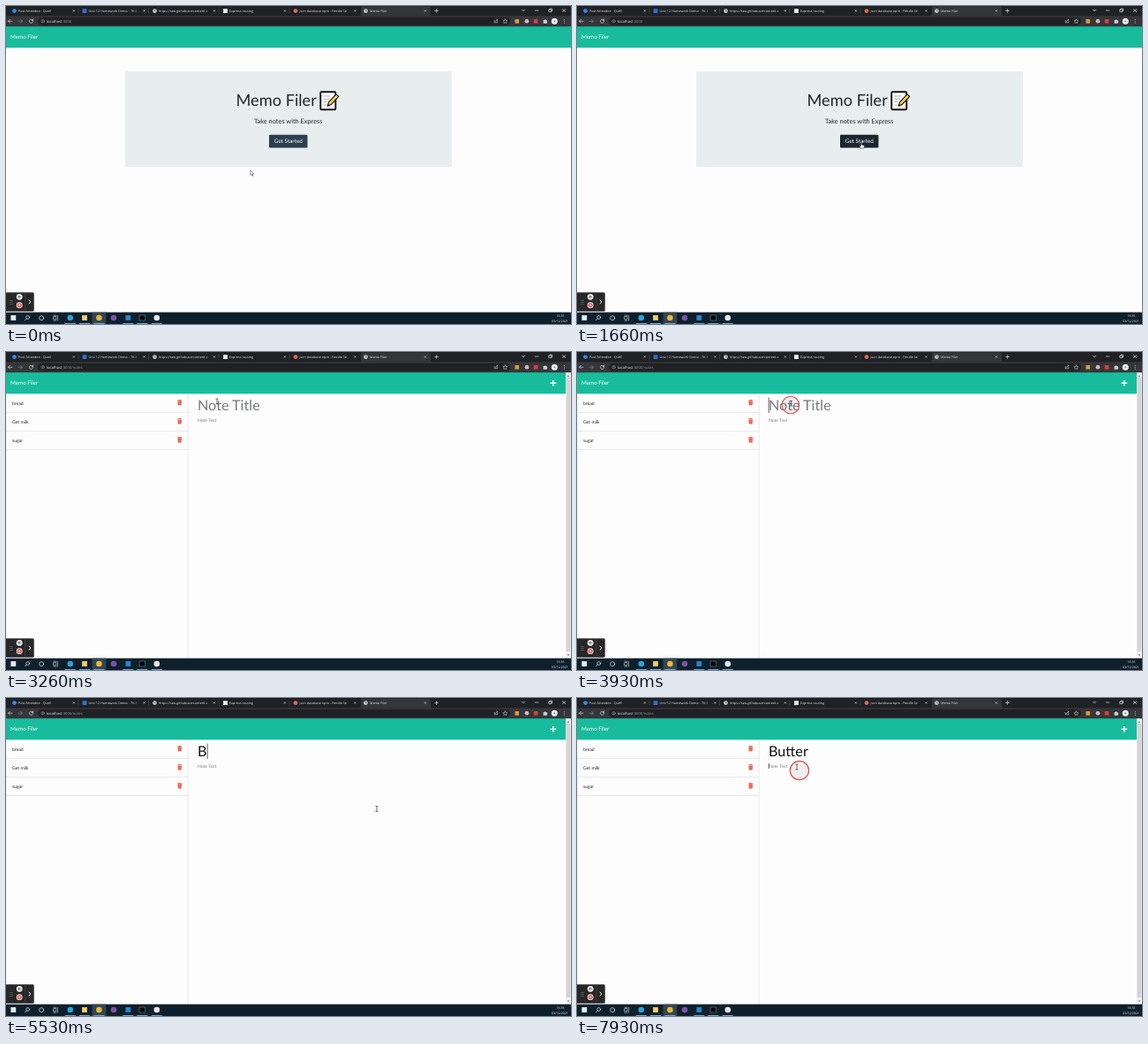
Recreate the animation shown at these times as an HTML page. Size 640 px wide and 360 px high, loop 8 s.

```html
<!DOCTYPE html>
<html lang="en">
<head>
<meta charset="utf-8">
<title>Memo Filer</title>
<style>
  html, body { margin: 0; width: 100%; height: 100%; overflow: hidden; background: #fdfdfd; }
  svg { display: block; width: 100vw; height: 100vh; }
  text { font-family: Lato, sans-serif; text-rendering: geometricPrecision; white-space: pre; }
  .ui { font-family: "Open Sans", "Noto Sans", sans-serif; }
  .line { fill: none; stroke-linecap: round; stroke-linejoin: round; }
</style>
</head>
<body>
<svg id="stage" viewBox="0 0 640 360" xmlns="http://www.w3.org/2000/svg">
  <defs>
    <g id="globe">
      <circle r="2.3" fill="#e6e8ea"/>
      <path d="M-1.7-.8L-.4-1.5L.5-.5L-.5.2L-.3 1.6M.8-1.5L1.6.2L.7.8" class="line" stroke="#5f6368" stroke-width=".6"/>
    </g>
    <g id="bin" fill="#e74c3c">
      <path d="M-2.6-2.7h1.5l.4-.5h1.4l.4.5h1.5v.8h-5.2z"/>
      <path d="M-2.2-1.5h4.4l-.2 4.1q0 .6-.6.6h-2.8q-.6 0-.6-.6z"/>
      <path d="M-1-.8v3.2M0-.8v3.2M1-.8v3.2" stroke="#f7c4be" stroke-width=".35"/>
    </g>
  </defs>

  <rect width="640" height="360" fill="#fdfdfd"/>
  <rect y="23" width="640" height="24.3" fill="#18bc9c"/>
  <text x="5" y="37.3" font-size="6.25" fill="#fff">Memo Filer</text>

  <g id="home">
    <rect x="135" y="74" width="370" height="108" fill="#e8eeed"/>
    <text x="260.5" y="113" font-size="18.2" fill="#212529">Memo Filer</text>
    <g id="pad">
      <rect x="356.3" y="97.2" width="17" height="20" rx="1" fill="#fff" stroke="#111" stroke-width="1.9"/>
      <path d="M359.5 102h8M359.5 105.3h7M359.5 108.6h4M359.5 112h4" stroke="#a7b4ba" stroke-width="1"/>
      <path d="M364.3 113.2l1.3-4.4 8.4-9 2.8 2.6-8.6 9.2z" fill="#f7c64a" stroke="#111" stroke-width="1.1" stroke-linejoin="round"/>
      <path d="M364.3 113.2l.6-2 1.5 1.3z" fill="#111"/>
      <path d="M366.5 110l7.5-8" stroke="#fff0bd" stroke-width=".6"/>
    </g>
    <text x="319.8" y="132.7" font-size="7.4" fill="#212529" text-anchor="middle">Take notes with Express</text>
    <rect id="glow" x="297.2" y="145" width="45.2" height="16.4" rx="1.8" fill="#96a5ae"/>
    <rect id="button" x="298" y="145.8" width="43.5" height="14.8" rx="1.3"/>
    <text x="319.8" y="155.4" font-size="6.35" fill="#fff" text-anchor="middle">Get Started</text>
  </g>

  <g id="notes">
    <path d="M619.9 32v6.6M616.6 35.3h6.6" stroke="#fff" stroke-width="1.6"/>
    <path d="M.4 47.3V347M206.2 47.3V347" stroke="#dfe2e3" stroke-width=".7"/>
    <g id="list"></g>
    <text id="title" x="217" y="66" font-size="16.2"></text>
    <text x="217" y="79" font-size="5" fill="#7b7f82">Note Text</text>
    <rect x="634" y="23" width="6" height="324" fill="#f1f1f1"/>
    <rect x="634.6" y="29" width="4.8" height="310" fill="#d4d4d4"/>
    <path d="M635.5 27.8l1.5-1.6 1.5 1.6zM635.5 342.4l1.5 1.6 1.5-1.6z" fill="#666"/>
    <rect id="caret" width=".7" fill="#222"/>
  </g>

  <g id="browser">
    <rect width="640" height="12" fill="#202124"/>
    <path d="M400 11.5q2 0 2-2V2.500q0-2 2-2h75q2 0 2 2v7q0 2 2 2z" fill="#35363a"/>
    <rect y="11.2" width="640" height="12" fill="#35363a"/>
    <rect x="36" y="12.7" width="535" height="9" rx="4.500" fill="#202124"/>
    <g id="tabs"></g>
    <g class="line" stroke="#dadce0" stroke-width=".7">
      <path d="M485.800 5.500h3.600M487.600 3.700v3.600"/>
      <path d="M584.600 4.300l1.600 1.600 1.600-1.600M599.500 5h3.500M615.200 4h2.600v2.600h-2.600zM616 4v-.9h2.700v2.700H618M630.500 3.500l3.200 3.200M633.700 3.500l-3.200 3.200"/>
      <path d="M7 17.200H2.600M4.500 15.300l-1.900 1.900 1.900 1.900"/>
      <path d="M14 17.200h4.400M16.500 15.300l1.900 1.900-1.900 1.900" stroke="#85888c"/>
      <path id="reload" d="M30.300 16.100a2.100 2.100 0 1 0 .3 1.500M30.600 14.900v1.500h-1.500"/>
      <path id="stop" d="M26.900 15.600l3.200 3.200M30.100 15.600l-3.200 3.200"/>
      <circle cx="41.600" cy="17.200" r="1.700" stroke="#a5a8ac" stroke-width=".5"/>
      <path d="M41.600 17v1M41.600 16.200v.01" stroke="#a5a8ac" stroke-width=".5"/>
      <path d="M553.200 16.400v2.400h3.500v-1.200M554.500 17.500q.2-1.800 2.300-1.800M556 14.900l.9.8-.9.8" stroke-width=".55"/>
      <path d="M565.400 14.900l.75 1.600 1.750.2-1.300 1.200.35 1.700-1.550-.85-1.550.85.35-1.700-1.300-1.200 1.750-.2z" stroke-width=".5"/>
    </g>
    <rect x="576.500" y="15" width="4.600" height="4.600" fill="#dd9a38"/>
    <circle cx="590" cy="17.200" r="2.400" fill="#d8b5b2"/>
    <rect x="597.800" y="15" width="4.600" height="4.600" fill="#d9403c"/>
    <path d="M608.600 16h1.300a.8.8 0 0 1 1.600 0h1.300v1.300a.8.8 0 0 1 0 1.500v1h-4.200z" fill="#c9ccd0"/>
    <circle cx="621.300" cy="17.200" r="3.500" fill="#eceef0"/>
    <circle cx="621.300" cy="17.200" r="1" fill="#8b8f94"/>
    <path d="M632.400 15.300v.01M632.400 17.200v.01M632.400 19.100v.01" class="line" stroke="#dadce0" stroke-width=".9"/>
    <text class="ui" x="46" y="18.900" font-size="4.200" fill="#eceef0">localhost<tspan id="path" fill="#94989d"></tspan></text>
  </g>

  <g id="taskbar">
    <rect y="346.700" width="640" height="13.300" fill="#0f202d"/>
    <rect x="97.500" y="346.700" width="15.800" height="13.300" fill="#35444f"/>
    <g class="line" stroke="#e4e8eb" stroke-width=".7">
      <circle cx="24.700" cy="352.500" r="1.900"/><path d="M23.300 353.900l-1.700 1.800"/>
      <circle cx="40.200" cy="353.200" r="2.500"/>
      <path d="M54 351.600h3v3.200h-3zM54 350.300h3M54 356.100h3M58.600 350.500v5.500" stroke-width=".55"/>
    </g>
    <g id="apps"></g>
    <g class="ui" font-size="3.500" fill="#f0f2f4" text-anchor="middle">
      <text class="ui" x="628" y="351.800">16:35</text>
      <text class="ui" x="627.500" y="357.700">03/12/2021</text>
    </g>
  </g>

  <g id="recorder">
    <rect x="-2" y="324" width="34" height="22" rx="1.800" fill="#272727" stroke="#e4e4e4" stroke-width=".6"/>
    <path d="M21.800 324.400v21.200" stroke="#555" stroke-width=".5"/>
    <path d="M5 333.500v.01M7 333.500v.01M5 335.500v.01M7 335.500v.01M5 337.500v.01M7 337.500v.01" class="line" stroke="#aaa" stroke-width=".8"/>
    <circle cx="15.200" cy="329.300" r="3.400" fill="#f4f4f4"/>
    <path d="M14.400 327.900v2.800M16 327.900v2.800" stroke="#333" stroke-width=".8"/>
    <circle cx="15.200" cy="338.700" r="3.400" fill="#f5eeee"/>
    <circle cx="15.200" cy="338.700" r="2.500" fill="#e0483e"/>
    <rect x="14.300" y="337.800" width="1.800" height="1.800" fill="#fff"/>
    <path d="M26 333l1.900 2-1.900 2" class="line" stroke="#fff" stroke-width=".9"/>
  </g>

  <circle id="ring"/>
  <g id="pointer">
    <path id="arrow" d="M0-2.800v5.300l1.200-1.100.9 2 .9-.4-.9-1.900h1.600z" fill="#fff" stroke="#222" stroke-width=".5"/>
    <path id="hand" d="M-.8-2.500q.6-.8 1.100 0v2.200l2.200.5q.7.200.6.900l-.5 2.500h-3.200l-1.900-2.400q.2-.8 1.700.2z" fill="#fff" stroke="#222" stroke-width=".5"/>
    <path id="beam" d="M-1.100-3q.9 0 1.100.4q.2-.4 1.100-.4M0-2.600v5.200M-1.100 3q.9 0 1.100-.4q.2.4 1.100.4" class="line" stroke="#222" stroke-width=".65"/>
  </g>
</svg>
<script>
const LOOP = 8000, BLINK = 530;
const OPEN = 2230, LOADED = 2600, FOCUS_TITLE = 3800, FOCUS_TEXT = 7740;
const $ = id => document.getElementById(id);
const set = (el, attrs) => { for (const k in attrs) el.setAttribute(k, attrs[k]); };
const show = (id, on) => { $(id).style.display = on ? "" : "none"; };

// favicon: a colour for a plain mark, or the globe
const tabs = [
  [9.5, "Post Attendee - Quell", "#2d8cff", true],
  [89, "Unit 12 Homework Demo - 7K-I", "#2f6fd6", false],
  [168.5, "https://raw.githubusercontent.c", ""],
  [248.5, "Express routing", "#eeeeee", false],
  [328, "json database npm - Fendle Se", "#e2685b", true],
  [407.5, "Memo Filer", ""]
];
const mark = (x, y, r, color, round) => round
  ? `<circle cx="${x}" cy="${y}" r="${r}" fill="${color}"/>`
  : `<rect x="${x - r}" y="${y - r}" width="${2 * r}" height="${2 * r}" fill="${color}"/>`;

$("tabs").innerHTML = tabs.map(([x, label, color, round], i) => {
  const icon = color ? mark(x, 5.6, 2.4, color, round)
    : `<use ${i === 5 ? 'id="favicon"' : ""} href="#globe" x="${x}" y="5.6"/>`;
  const edge = i < 4 ? `<path d="M${x + 72.500} 2.500v6" stroke="#5f6368" stroke-width=".5"/>` : "";
  return `${icon}<text class="ui" x="${x + 4.500}" y="7" font-size="3.75" fill="#dfe1e4">${label}</text>
    <path d="M${x + 66.300} 4.400l2.200 2.200m0-2.200l-2.200 2.200" stroke="#dadce0" stroke-width=".6"/>${edge}`;
}).join("") + '<path id="spinner" d="M0-2a2 2 0 0 1 2 2" class="line" stroke="#9aa6b5" stroke-width=".7"/>';

$("list").innerHTML = ["bread", "Get milk", "sugar"].map((name, i) => {
  const y = 57.500 + 21.100 * i;
  return `<text x="7" y="${y + 2}" font-size="5.1" fill="#212529">${name}</text>
    <use href="#bin" x="196.700" y="${y - .4}"/>
    <path d="M0 ${y + 10.900}h206" stroke="#dfe2e3" stroke-width=".7"/>`;
}).join("");

// x, colour, round, running
const apps = [
  [8.3, "#e6edf2", false, false], [72.8, "#2da3d5", true, true], [89, "#f3cf69", false, true],
  [105.400, "#e6b83c", true, true], [122, "#7d52a5", true, false], [138.300, "#2489ca", false, true],
  [154.300, "#050708", false, true], [170.800, "#e9e6ea", true, true]
];
$("apps").innerHTML = apps.map(([x, color, round, running]) =>
  mark(x, 353, round ? 3.300 : 2.900, color, round) +
  (running ? `<path d="M${x - 6} 359.500h12" stroke="#76b9ed" stroke-width=".9"/>` : "")).join("");
$("apps").innerHTML += '<path d="M151 350h6.600v6h-6.600z" fill="none" stroke="#87929a" stroke-width=".5"/>';

// time, x, y
const route = [
  [0, 277, 189], [120, 277, 189], [680, 322.500, 158], [1500, 322.500, 158], [1900, 322, 156.500],
  [2300, 322, 156.500], [2460, 323, 194], [2640, 321, 188], [2860, 321, 188], [3240, 239, 56],
  [3880, 239, 57], [4530, 443, 120.500], [4860, 443, 120.500], [5530, 420, 125.500],
  [6660, 420, 125.500], [7390, 249, 78], [LOOP, 249, 78]
];
function place(t) {
  const i = route.findIndex(p => p[0] > t);
  const [t0, x0, y0] = route[i - 1], [t1, x1, y1] = route[i];
  const u = (t - t0) / (t1 - t0), e = u * u * (3 - 2 * u);
  return [x0 + (x1 - x0) * e, y0 + (y1 - y0) * e];
}

const clicks = [[OPEN, 322, 155], [FOCUS_TITLE, 242, 60], [FOCUS_TEXT, 252, 82]];
function drawRing(t) {
  const click = clicks.find(c => t >= c[0] && t < c[0] + 430);
  show("ring", click);
  if (!click) return;
  const age = t - click[0], grow = Math.min(1, age / 150);
  set($("ring"), {
    cx: click[1], cy: click[2], r: 4 + 6.600 * grow,
    fill: "rgba(110,70,70,.08)", stroke: "#d8504b", "stroke-width": 1.200,
    opacity: Math.min(1, (430 - age) / 180)
  });
}

const keys = [5400, 5730, 5860, 5990, 6200, 6330];
function drawFields(t) {
  const typed = "Butter".slice(0, keys.filter(k => k <= t).length);
  const title = $("title");
  title.textContent = typed || "Note Title";
  title.setAttribute("fill", typed ? "#111" : "#77797b");
  const inText = t >= FOCUS_TEXT;
  const since = Math.max(FOCUS_TITLE, ...keys.filter(k => k <= t), inText ? FOCUS_TEXT : 0);
  show("caret", t >= FOCUS_TITLE && Math.floor((t - since) / BLINK) % 2 === 0);
  const x = typed && !inText ? 217.300 + title.getComputedTextLength() : 216.800;
  set($("caret"), inText ? { x, y: 74, height: 6 } : { x, y: 51.500, height: 17.500 });
}

function draw(t) {
  const onNotes = t >= LOADED, loading = t >= OPEN + 70 && !onNotes;
  const [x, y] = place(t);
  const over = !onNotes && x > 298 && x < 341.500 && y > 147 && y < 162;
  show("home", !onNotes);
  show("notes", onNotes);
  show("reload", !loading);
  show("stop", loading);
  show("favicon", !loading);
  show("spinner", loading);
  $("spinner").setAttribute("transform", `translate(407.500 5.600) rotate(${-t * .36})`);
  $("path").textContent = t >= OPEN + 70 ? ":3000/notes" : ":3000";
  $("button").setAttribute("fill", over || t >= OPEN ? "#1a252f" : "#2c3e50");
  show("glow", t >= OPEN);
  const beam = onNotes || t > 2400;
  show("arrow", !over && !beam);
  show("hand", over && !beam);
  show("beam", beam);
  $("pointer").setAttribute("transform", `translate(${x} ${y})`);
  drawRing(t);
  drawFields(t);
}

function tick() {
  draw(performance.now() % LOOP);
  requestAnimationFrame(tick);
}
tick();
</script>
</body>
</html>
```
